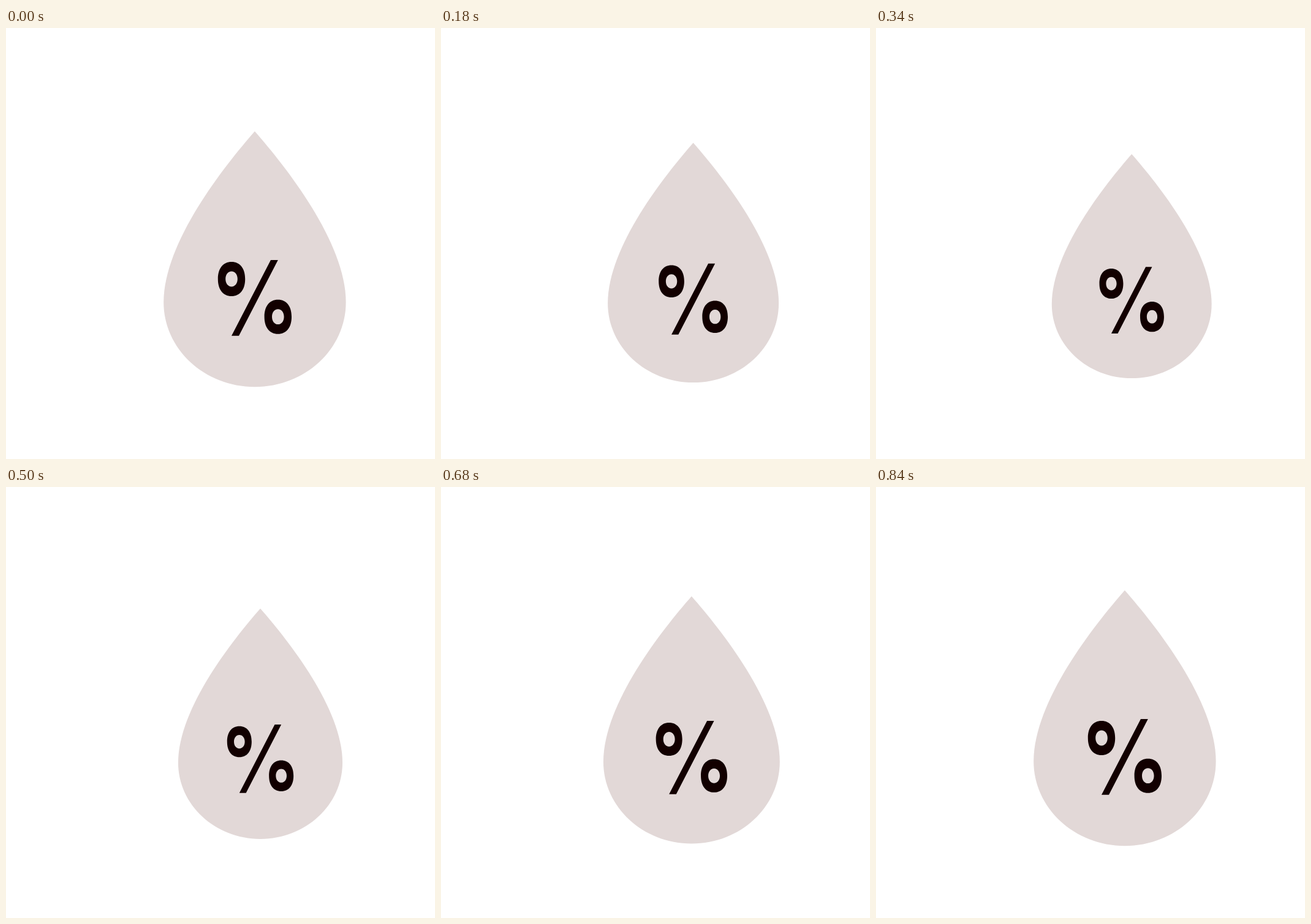
An HTML page with a canvas for the animation above (2.98 s loop, 700 by 704 pixels).

```html
<!DOCTYPE html>
<html lang="en">
<head>
<meta charset="utf-8">
<title>Humidity drop</title>
<style>
  html, body { margin: 0; width: 100%; height: 100%; overflow: hidden; background: #fff; }
  canvas { display: block; }
</style>
</head>
<body>
<canvas id="stage" width="700" height="704"></canvas>
<script>
const ctx = document.getElementById('stage').getContext('2d');

const LOOP = 2980, STEP = 20;
const PRESS = 360, RELEASE = 840;   // ms: smallest size, back to full size
const SHRINK = 0.124;
const PIVOT = { x: 498, y: 471.5 };

const smooth = u => u * u * (3 - 2 * u);

function scaleAt(t) {
  if (t >= RELEASE) return 1;
  const p = t < PRESS ? smooth(t / PRESS) : 1 - smooth((t - PRESS) / (RELEASE - PRESS));
  return 1 - SHRINK * p;
}

function dropPath() {
  const p = new Path2D();
  const cx = 405.9, left = 257.2, right = 554.6, mid = 448, bottom = 586.2;
  const k = 0.5523, kx = (right - cx) * k, ky = (bottom - mid) * k;
  p.moveTo(cx, 168.8);
  p.bezierCurveTo(cx + 50, 226, right, 350, right, mid);
  p.bezierCurveTo(right, mid + ky, cx + kx, bottom, cx, bottom);
  p.bezierCurveTo(cx - kx, bottom, left, mid + ky, left, mid);
  p.bezierCurveTo(left, 350, cx - 50, 226, cx, 168.8);
  p.closePath();
  return p;
}

// Rounded zero shape, slightly squarer than an ellipse
function addOval(p, x, y, rx, ry, k) {
  const a = rx * k, b = ry * k;
  p.moveTo(x, y - ry);
  p.bezierCurveTo(x + a, y - ry, x + rx, y - b, x + rx, y);
  p.bezierCurveTo(x + rx, y + b, x + a, y + ry, x, y + ry);
  p.bezierCurveTo(x - a, y + ry, x - rx, y + b, x - rx, y);
  p.bezierCurveTo(x - rx, y - b, x - a, y - ry, x, y - ry);
  p.closePath();
}

function percentPath() {
  const p = new Path2D();
  for (const [x, y] of [[368, 410], [443.8, 471.7]]) {
    addOval(p, x, y, 22.2, 28, 0.62);
    addOval(p, x, y, 9.8, 12.4, 0.58);
  }
  p.moveTo(432, 379);
  p.lineTo(443.8, 379);
  p.lineTo(380, 502.8);
  p.lineTo(368, 502.8);
  p.closePath();
  return p;
}

const drop = dropPath(), percent = percentPath();

function draw(t) {
  const s = scaleAt(t);
  ctx.setTransform(1, 0, 0, 1, 0, 0);
  ctx.fillStyle = '#fff';
  ctx.fillRect(0, 0, 700, 704);
  ctx.setTransform(s, 0, 0, s, PIVOT.x * (1 - s), PIVOT.y * (1 - s));
  ctx.fillStyle = '#e2d8d7';
  ctx.fill(drop);
  ctx.fillStyle = '#120000';
  ctx.fill(percent, 'evenodd');
}

const start = performance.now();

function tick() {
  const t = (performance.now() - start) % LOOP;
  draw(Math.floor(t / STEP) * STEP);
  requestAnimationFrame(tick);
}

tick();
</script>
</body>
</html>
```
